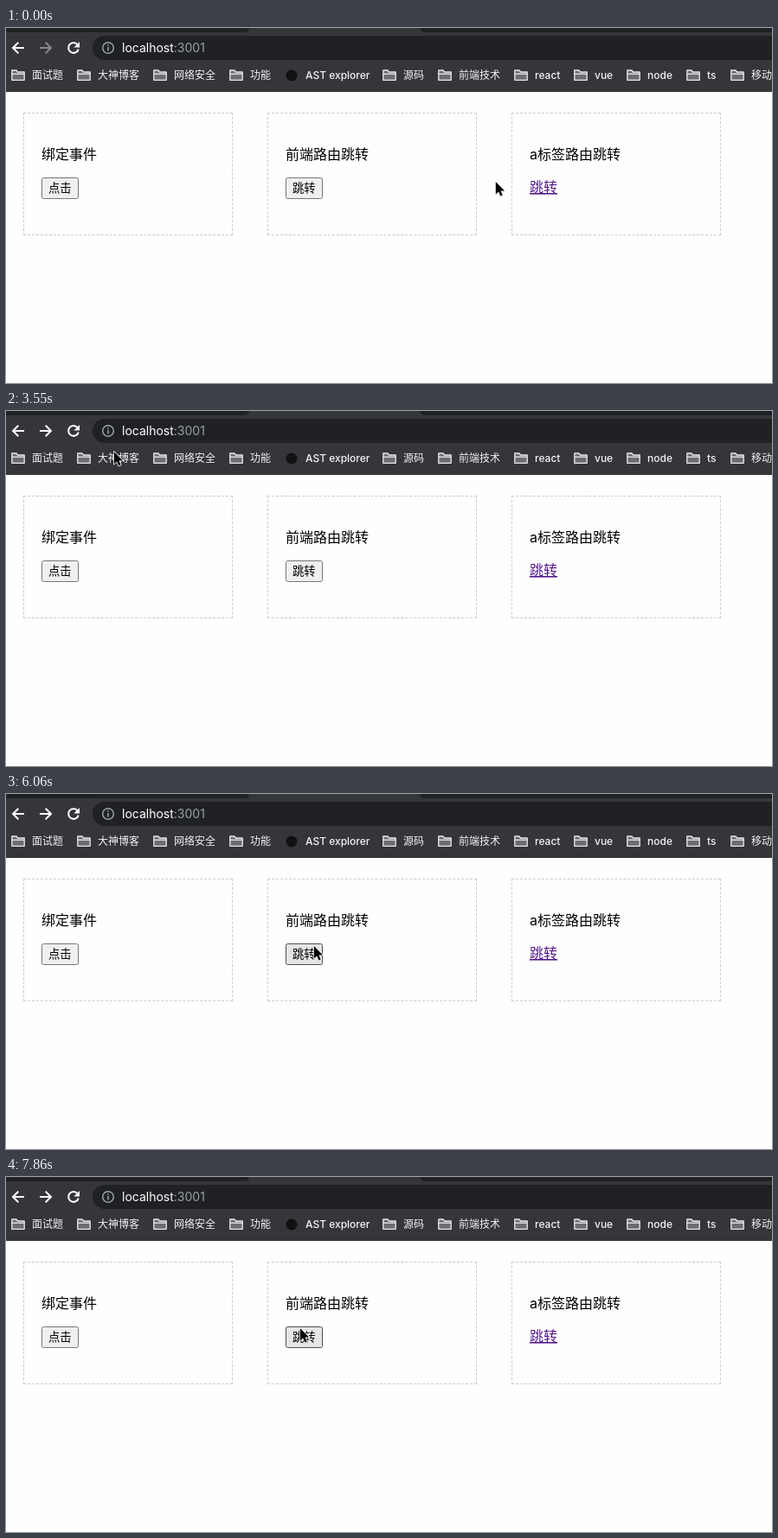
An HTML page that plays this animation: 885x411 px, repeating every 8 s.

```html
<!DOCTYPE html>
<html lang="zh-CN">
<head>
<meta charset="utf-8">
<style>
html, body { margin: 0; width: 100%; height: 100%; overflow: hidden; background: #fefefe; }
svg { display: block; width: 885px; height: 411px; }
text { font-family: Inter, "Noto Sans CJK SC", "Noto Sans CJK", sans-serif; font-size: 16px; fill: #000; }
#list text { font-family: "Noto Sans CJK SC", "Noto Sans CJK", sans-serif; }
#marks text { font-size: 12px; font-weight: 500; fill: #f1f3f4; }
.url { font-size: 14px; fill: #fff; }
.dim { fill: #9aa0a6; }
.btn rect { fill: #efefef; stroke: #767676; }
.btn text { font-size: 13.333px; }
.btn.over rect { fill: #e5e5e5; stroke: #4f4f4f; }
#link { fill: #551a8b; text-decoration: underline; }
#link.down { fill: #e00; }
.icon { fill: none; stroke: #fff; stroke-width: 2; }
.box { box-sizing: border-box; width: 242px; height: 142px; border: 1px dashed #ccc; }
</style>
</head>
<body>
<svg viewBox="0 0 885 411">
  <rect width="885" height="411" fill="#fefefe"/>

  <g id="home">
    <g id="boxes"></g>
    <text x="41" y="152">绑定事件</text>
    <text x="323" y="152">前端路由跳转</text>
    <text x="605" y="152">a标签路由跳转</text>
    <g class="btn">
      <rect x="41.5" y="173.5" width="42" height="24" rx="2"/>
      <text x="49" y="190">点击</text>
    </g>
    <g class="btn" id="jump">
      <rect x="323.5" y="173.5" width="42" height="24" rx="2"/>
      <text x="331" y="190">跳转</text>
    </g>
    <text id="link" x="605" y="190">跳转</text>
  </g>

  <g id="list"></g>

  <rect width="885" height="74" fill="#35363a"/>
  <path d="M0 0H281Q280 5 275 5H0ZM478 0H885V5H484Q479 5 478 0Z" fill="#202124"/>
  <rect x="100" y="9" width="820" height="28" rx="14" fill="#202124"/>
  <circle id="halo" cx="14" cy="23" r="14" fill="#4b4c50"/>
  <path class="icon" d="M21 23H8.5M14.3 16.7L8 23L14.3 29.3"/>
  <path class="icon" id="forward" d="M39 23H51.5M45.7 16.7L52 23L45.7 29.3"/>
  <path class="icon" d="M82.6 19.2A5.9 5.9 0 1 0 83.7 24.6"/>
  <path d="M85 16V22.6H78.4Z" fill="#fff"/>
  <circle cx="118" cy="23" r="6.3" fill="none" stroke="#9aa0a6" stroke-width="1.5"/>
  <path d="M118 22V26.5M118 19.2V20.8" stroke="#9aa0a6" stroke-width="1.6"/>
  <text class="url" x="134" y="28">localhost<tspan class="dim" id="path">:3001</tspan></text>
  <g id="marks"></g>

  <g id="pointer">
    <g id="arrow" stroke-linejoin="round">
      <path d="M1 2.5V17L4.3 14L6.5 19L9 18L6.8 13H11.2Z" fill="#000" opacity=".15"/>
      <path d="M.8 1V15.4L4.1 12.4L6.3 17.4L8.7 16.4L6.5 11.5H11Z" stroke="#fff" stroke-width="1.6"/>
      <path d="M.8 1V15.4L4.1 12.4L6.3 17.4L8.7 16.4L6.5 11.5H11Z"/>
    </g>
    <path id="hand" fill="#fff" stroke="#000" stroke-linejoin="round"
      d="M-1.5 10V1.8Q-1.5 .5 0 .5T1.5 1.8V7Q4 5.8 4.4 7.4Q6.6 6.6 7 8.3Q9.6 7.8 9.5 10.2Q9.5 13 8 15V17.5H0V15.5Q-2.5 13.5 -5.4 10Q-5.8 8.2 -4 8.2Q-2.8 8.6 -1.5 10Z"/>
  </g>
</svg>
<script>
const $ = id => document.getElementById(id);
const show = (id, on) => $(id).setAttribute('visibility', on ? 'visible' : 'hidden');

$('boxes').innerHTML = [20, 302, 584].map(x =>
  `<foreignObject x="${x}" y="98" width="242" height="142"><div class="box"></div></foreignObject>`).join('');

$('list').innerHTML = [
  '临别殷勤重寄词，词中有誓两心知。',
  '七月七日长生殿，夜半无人私语时。',
  '在天愿作比翼鸟，在地愿为连理枝。',
  '天长地久有时尽，此恨绵绵无绝期。'
].map((s, i) => `<text x="0" y="${107 + 38 * i}">${s}</text>`).join('');

const folder = x => `<g transform="translate(${x} 48)" stroke="#e8eaed" stroke-width="1.3" stroke-linejoin="round">
  <path d="M.8 1H6L7.5 3H15.2V12.3H.8Z" fill="#6c6d70"/><path d="M.8 5.2H15.2"/></g>`;
const marks = [[6, '面试题'], [82, '大神博客'], [170, '网络安全'], [258, '功能'], [322, 'AST explorer'],
  [435, '源码'], [499, '前端技术'], [587, 'react'], [656, 'vue'], [717, 'node'], [786, 'ts'], [837, '移动端']];
$('marks').innerHTML = marks.map(([x, name]) =>
  (name === 'AST explorer' ? `<circle cx="${x + 8}" cy="55" r="6.5" fill="#111"/>` : folder(x)) +
  `<text x="${x + 24}" y="59">${name}</text>`).join('');

const LOOP = 8000, STEPS = 54;

// pointer stops: step, x, y
const stops = [
  [0, 565, 177], [3, 625, 181], [12, 625, 181], [20, 12, 20], [22, 14, 22],
  [24, 124, 46], [27, 348, 179], [29, 352, 180], [31, 376, 140], [34, 14, 20],
  [37, 15, 22], [40, 342, 170], [41, 355, 175], [43, 350, 176], [44, 290, 161],
  [47, 13, 20], [49, 16, 22], [51, 278, 140], [52, 322, 165], [53, 339, 174]
];

function place(k) {
  const i = Math.max(1, stops.findIndex(s => s[0] >= k));
  const [k0, x0, y0] = stops[i - 1], [k1, x1, y1] = stops[i];
  let p = (k - k0) / (k1 - k0);
  if (k1 - k0 > 2) p = p * p * (3 - 2 * p);
  return [x0 + (x1 - x0) * p, y0 + (y1 - y0) * p];
}

const within = (v, a, b) => v >= a && v < b;

function draw(t) {
  // the screen refreshes in even steps
  const k = Math.min(STEPS - 1, Math.floor((t + 20) * STEPS / LOOP));
  const [x, y] = place(k);
  const list = within(k, 9, 21) || within(k, 29, 35) || within(k, 43, 48);
  const hand = within(k, 3, 10);

  show('home', !list);
  show('list', list);
  $('path').textContent = list ? ':3001/list' : ':3001';
  $('forward').style.stroke = list || k < 9 ? '#87888b' : '#fff';
  show('halo', within(k, 18, 20));
  $('jump').classList.toggle('over', within(x, 323, 366) && within(y, 173, 198));
  $('link').classList.toggle('down', k === 8);
  show('hand', hand);
  show('arrow', !hand);
  $('pointer').setAttribute('transform', `translate(${Math.round(x)} ${Math.round(y)})`);
}

function tick() {
  draw(performance.now() % LOOP);
  requestAnimationFrame(tick);
}
tick();
</script>
</body>
</html>
```
